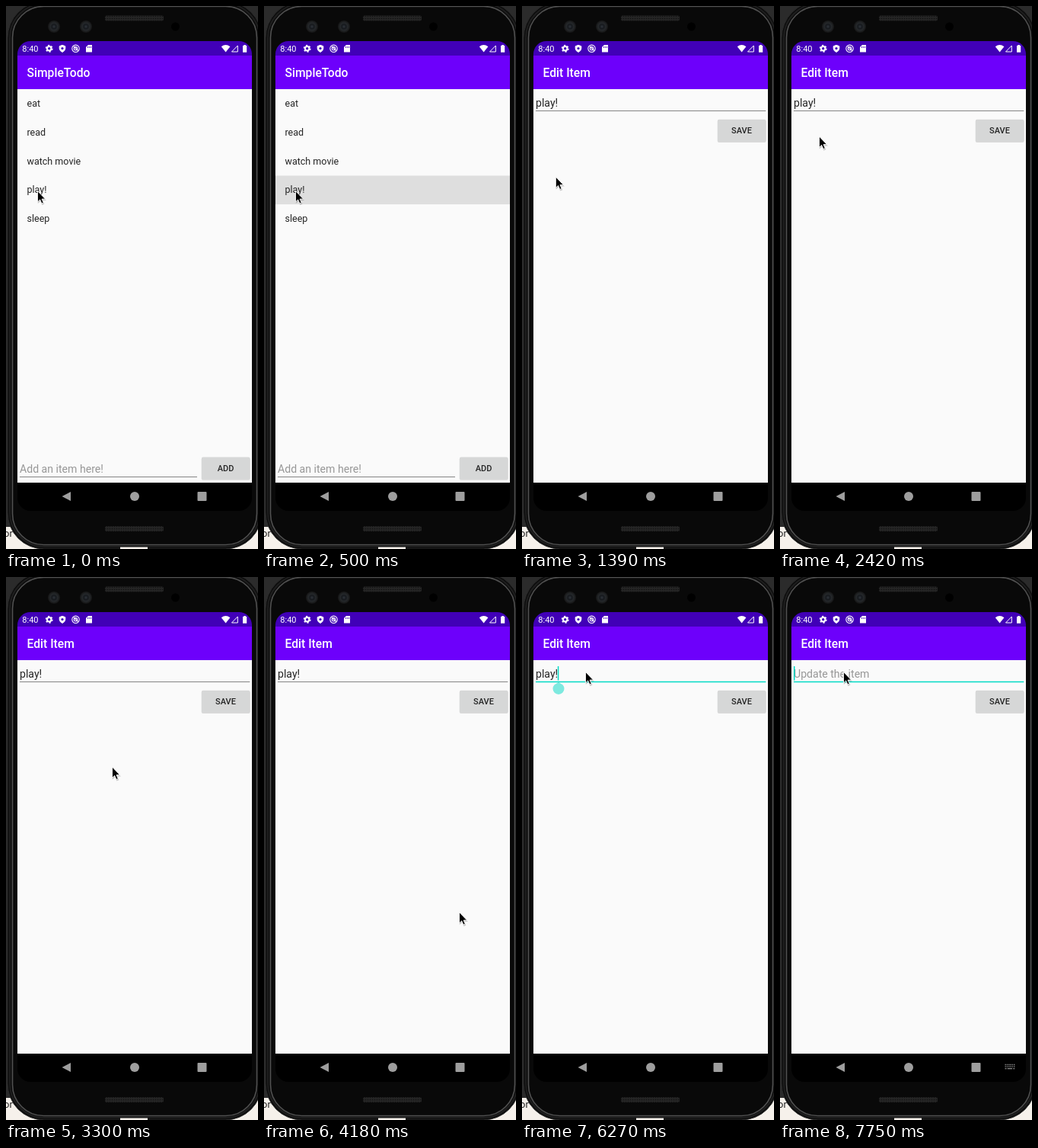
An HTML page that plays this animation: 331 by 712 pixels, repeating every 8000 ms.

```html
<!DOCTYPE html>
<html lang="en">
<head>
<meta charset="utf-8">
<title>Todo app demo</title>
<style>
html, body { margin: 0; width: 100%; height: 100%; overflow: hidden; background: #0a0a0a; }
svg { display: block; width: 331px; height: 712px; }
text { font-family: Roboto, "Liberation Sans", sans-serif; fill: #242424; white-space: pre; }
.item { font-size: 12.53px; }
.field { font-size: 14.1px; }
.hint { fill: #979797; }
.title { font-size: 15.67px; font-weight: 500; fill: #fff; }
.btn { font-size: 10.97px; font-weight: 500; text-anchor: middle; }
</style>
</head>
<body>
<svg viewBox="0 0 331 712">
  <defs>
    <clipPath id="glass"><rect x="15" y="46" width="308" height="616" rx="17"/></clipPath>
    <pattern id="mesh" width="3" height="3" patternUnits="userSpaceOnUse">
      <rect width="3" height="3" fill="#252525"/><circle cx="1.5" cy="1.5" r=".8" fill="#111"/>
    </pattern>
    <radialGradient id="lens">
      <stop offset="0" stop-color="#30353c"/><stop offset=".35" stop-color="#16191d"/>
      <stop offset=".6" stop-color="#25282b"/><stop offset="1" stop-color="#151515"/>
    </radialGradient>
    <g id="window">
      <rect x="15" y="46" width="308" height="616" fill="#000"/>
      <rect x="15" y="46" width="308" height="19.5" fill="#4100b7"/>
      <rect x="15" y="65" width="308" height="44" fill="#6d00fb"/>
      <rect x="15" y="109" width="308" height="516" fill="#fafafa"/>
    </g>
    <g id="button">
      <rect x="256.7" y=".7" width="64" height="29.6" rx="2" fill="#000" opacity=".13"/>
      <rect x="257" width="63.3" height="29" rx="1.6" fill="#d6d7d7"/>
    </g>
  </defs>

  <!-- phone body, centred on x = 169 -->
  <rect width="331" height="712" fill="#2b2b2b"/>
  <rect y="683" width="331" height="29" fill="#f6f1eb"/>
  <text x="-3" y="696" font-size="13">or</text>
  <rect x="2" y="-6" width="334" height="718" rx="48" fill="#0c0c0c" stroke="#2c2c2c"/>
  <rect x="5" y="-3" width="328" height="712" rx="45" fill="none" stroke="#1e1e1e" stroke-width="2"/>
  <rect x="8.5" y=".5" width="321" height="706" rx="41" fill="#090909" stroke="#505050" stroke-width="1.6"/>
  <rect x="150" y="709.5" width="36" height="3" fill="#f6f1eb"/>
  <rect x="130" y="12.5" width="77" height="7" rx="2" fill="url(#mesh)"/>
  <rect x="130" y="682" width="77" height="7" rx="2" fill="url(#mesh)"/>
  <circle cx="63" cy="27" r="8" fill="url(#lens)"/>
  <circle cx="105" cy="27" r="8" fill="url(#lens)"/>
  <circle cx="222.5" cy="27" r="5.5" fill="#000"/>

  <g clip-path="url(#glass)">
    <g id="list">
      <use href="#window"/>
      <rect id="ripple" x="15" y="222.5" width="308" height="37.6" fill="#dedede"/>
      <text class="title" x="27.5" y="93">SimpleTodo</text>
      <g id="items"></g>
      <text class="field hint" x="18" y="612">Add an item here!</text>
      <path d="M18 617.5H251" stroke="#858585"/>
      <use href="#button" y="591.5"/>
      <text class="btn" x="288.5" y="610">ADD</text>
    </g>
    <g id="edit">
      <use href="#window"/>
      <text class="title" x="27.5" y="93">Edit Item</text>
      <text class="field" id="entry" x="18" y="131.5"></text>
      <path id="rule" d="M18 137.5H320.3"/>
      <rect id="caret" y="117" width="1.5" height="18.5" fill="#03dac5"/>
      <path id="handle" d="M48 138l5.4 3.2a7.5 7.5 0 1 1-10.8 0z" fill="#03dac5"/>
      <use href="#button" y="148.8"/>
      <text class="btn" x="288.5" y="167">SAVE</text>
    </g>

    <!-- status bar -->
    <text x="21.3" y="60" font-size="11" style="fill:#fff">8:40</text>
    <g fill="none" stroke="#fff">
      <circle cx="56.7" cy="55.8" r="2.7" stroke-width="2"/>
      <circle cx="56.7" cy="55.8" r="4.2" stroke-width="1.5" stroke-dasharray="2.2"/>
      <path d="M74 51.3l3.8 1.5v3q-.3 3.2-3.8 4.7q-3.5-1.5-3.8-4.7v-3z" fill="#fff"/>
      <circle cx="74" cy="55.6" r="1.6" fill="#4100b7" stroke="none"/>
      <circle cx="91.5" cy="55.8" r="4.7" stroke-width="1.1"/>
      <circle cx="91.5" cy="55.8" r="2.2" stroke-width="1.1"/>
      <path d="M89 53l5.5 5.5" stroke-width="1.2"/>
      <path d="M296.5 60H304.3V52z"/>
    </g>
    <g fill="#fff">
      <path d="M108 51h5v9.5h-8V54z"/>
      <path d="M282.8 53.2q5.8-4.4 11.6 0L288.6 60.6z"/>
      <path d="M311 52h1.3v-1h2.6v1h1.3v8.7H311z"/>
    </g>
    <path d="M107.5 53v2m2-2v2m2-2v2" stroke="#4100b7" stroke-width=".8"/>

    <!-- navigation bar -->
    <g fill="#9e9e9e">
      <path d="M73.5 643L85 637V649z"/>
      <circle cx="169" cy="643" r="6"/>
      <rect x="251.5" y="637" width="12" height="12" rx="1"/>
    </g>
    <g id="keys" stroke="#8c8c8c" stroke-width="1.3" fill="none">
      <path d="M295.5 639.5h13m-13 2.6h13" stroke-dasharray="1.4 .9"/>
      <path d="M295.5 644.6h2m1.2 0h6.4m1.2 0h2"/>
    </g>
  </g>

  <g id="mouse">
    <path d="M.3 2v14.5l3.4-3 2.2 5 3-1.2-2.2-4.8h4.8z" fill="#000" opacity=".2"/>
    <path d="M0 0v14.4l3.2-3 2.2 5.1 2.4-1-2.2-4.9h4.5z" fill="#000" stroke="#fff" stroke-width=".9"/>
  </g>
</svg>

<script>
const LOOP = 8000, FIRST = 480, TICK = 148;
const $ = id => document.getElementById(id);
const list = $("list"), edit = $("edit"), entry = $("entry"), rule = $("rule"), ripple = $("ripple"),
      caret = $("caret"), handle = $("handle"), keys = $("keys"), mouse = $("mouse");

$("items").innerHTML = ["eat", "read", "watch movie", "play!", "sleep"]
  .map((s, i) => `<text class="item" x="27.5" y="${132.4 + 37.6 * i}">${s}</text>`).join("");

// Pointer strokes: from tick, to tick, end x, end y; it rests in between.
const strokes = [
  [5, 8, 50, 187], [12, 14, 53, 155], [14, 18, 147, 258], [18, 20, 132, 240],
  [20, 22, 205, 228], [22, 23, 291, 320], [23, 25, 256.5, 439.5],
  [27, 29, 284, 561], [29, 32, 230, 215], [32, 34, 193.5, 192.5], [34, 38, 83.5, 124.5]
];

const clamp = v => Math.min(1, Math.max(0, v));
const show = (el, on) => el.setAttribute("visibility", on ? "visible" : "hidden");
const zoom = (el, s) => el.setAttribute("transform",
  `translate(169 355) scale(${s}) translate(-169 -355)`);

function pointer(n) {
  let x = 41.5, y = 242.5;
  for (const [from, to, ex, ey] of strokes) {
    const u = clamp((n - from) / (to - from));
    x += (ex - x) * u;
    y += (ey - y) * u;
  }
  return `translate(${x} ${y})`;
}

function typed(n) {
  if (n >= 49) return "";
  return "play!".slice(0, n < 44 ? 5 : Math.max(1, 4 - 1.5 * (n - 44)));
}

function draw(t) {
  const n = Math.floor((t - FIRST) / TICK);
  const opened = n < 3 ? 1 - Math.exp(-2.73 * Math.max(0, n)) : 1;
  const word = typed(n), focused = n >= 39;

  show(list, opened < 1);
  show(edit, opened > 0);
  show(ripple, n === 0);
  zoom(list, 1 + 0.05 * opened);
  zoom(edit, 0.85 + 0.15 * opened);

  entry.textContent = word || "Update the item";
  entry.classList.toggle("hint", !word);
  rule.setAttribute("stroke", focused ? "#03dac5" : "#858585");
  rule.setAttribute("stroke-width", focused ? 1.6 : 1);

  caret.setAttribute("x", word ? 17.6 + entry.getComputedTextLength() : 18);
  show(caret, focused);
  show(handle, focused && n < 44);
  handle.setAttribute("opacity", n < 40 ? 0.5 : 1);
  show(keys, n >= 41);
  mouse.setAttribute("transform", pointer(n));
}

const start = performance.now();
function tick() {
  draw((performance.now() - start) % LOOP);
  requestAnimationFrame(tick);
}
tick();
</script>
</body>
</html>
```
